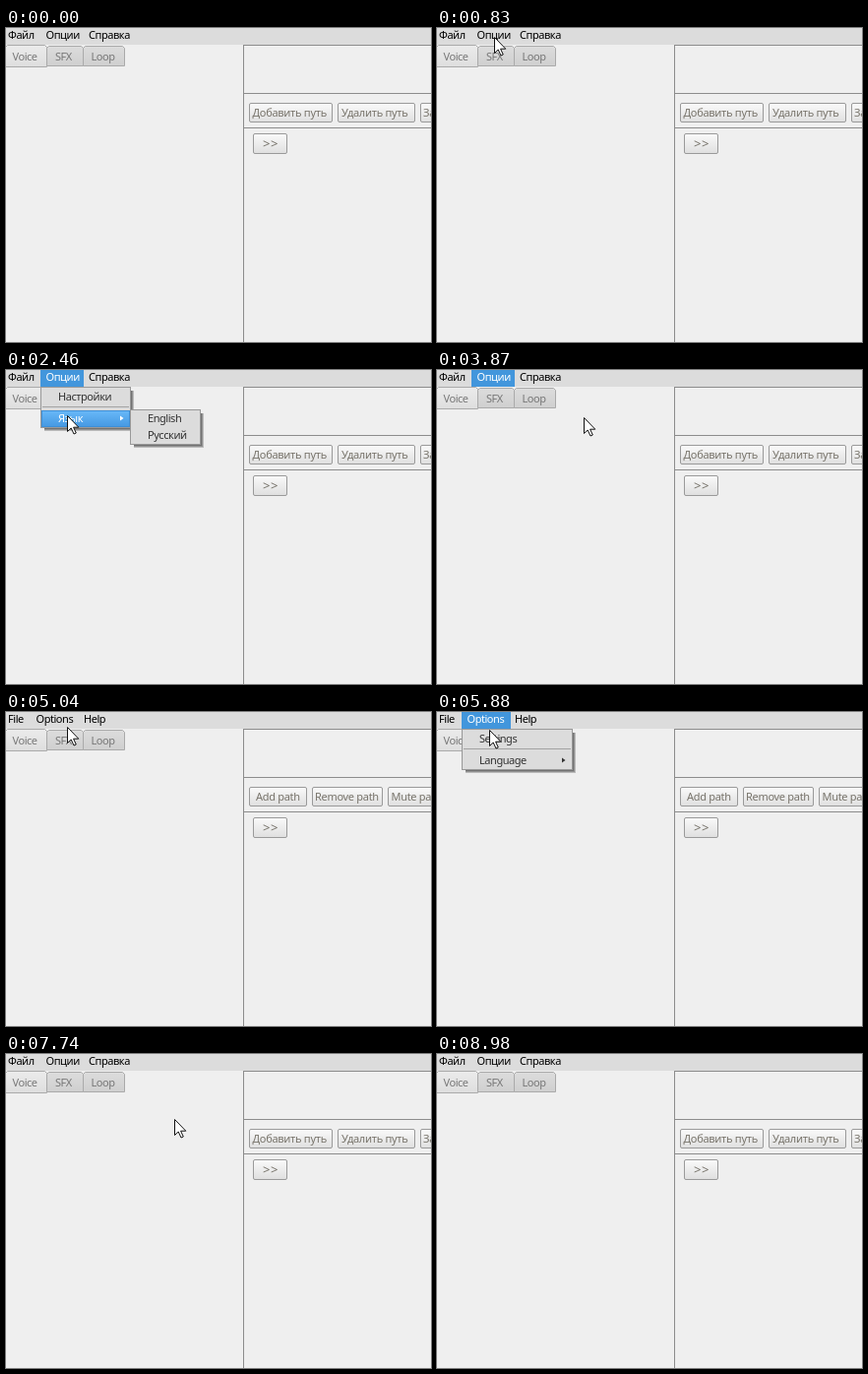
Animation of 432x319 px, one loop 9.36 s. Source, as an HTML page:

```html
<!DOCTYPE html>
<html lang="ru">
<head>
<meta charset="utf-8">
<style>
  html, body { margin: 0; width: 100%; height: 100%; overflow: hidden; background: #efefef; }
  svg { display: block; }
  text { font: 11px "Noto Sans", sans-serif; letter-spacing: -.45px; white-space: pre; }
</style>
</head>
<body>
<svg width="432" height="319" viewBox="0 0 432 319">
  <defs>
    <linearGradient id="btn" x2="0" y2="1"><stop stop-color="#fafafa"/><stop offset="1" stop-color="#dfdfdf"/></linearGradient>
    <linearGradient id="tab" x2="0" y2="1"><stop stop-color="#dcdcdc"/><stop offset="1" stop-color="#cfcfcf"/></linearGradient>
    <linearGradient id="sel" x2="0" y2="1"><stop stop-color="#ebebeb"/><stop offset="1" stop-color="#dedede"/></linearGradient>
    <linearGradient id="hot" x2="0" y2="1"><stop stop-color="#68b8f8"/><stop offset="1" stop-color="#4699e2"/></linearGradient>
  </defs>
  <g id="ui"></g>
  <path id="cursor" d="M.5 .5V16.5L4.2 13L7 19L9.3 18L6.6 12.2H11.8Z" fill="#fff" stroke="#111"/>
</svg>
<script>
const LOOP = 9360;
const ui = document.getElementById('ui'), cursor = document.getElementById('cursor');

const LANG = {
  ru: {
    bar: [[2, 'Файл'], [40.5, 'Опции'], [84, 'Справка']],
    head: [35, 43], popup: [35, 92], items: ['Настройки', 'Язык'],
    buttons: [[247, 84, 250.5, 'Добавить путь'], [337, 78, 341, 'Удалить путь'], [421, 96, 424, 'Заглушить путь']]
  },
  en: {
    bar: [[2, 'File'], [30.5, 'Options'], [79, 'Help']],
    head: [25, 49], popup: [25, 113], items: ['Settings', 'Language'],
    buttons: [[247, 58, 254, 'Add path'], [311, 71, 314, 'Remove path'], [388, 62, 391.5, 'Mute path']]
  }
};

// Pointer moves: first change, last change, steps, end x, end y, easing
const linear = k => k, easeIn = k => k * k, easeOut = k => 1 - (1 - k) ** 2;
const START = [328, 329];
const MOVES = [
  [140, 830, 10, 58, 9, easeOut],
  [2070, 2310, 4, 62, 46, linear],
  [2780, 3090, 5, 149, 48, easeOut],
  [4640, 4810, 3, 78, 24, linear],
  [4960, 5120, 3, 54, 10, linear],
  [5270, 5350, 2, 53, 6, linear],
  [5880, 5880, 1, 53, 18, linear],
  [5960, 6040, 2, 61, 40, linear],
  [6360, 6590, 4, 64, 46, linear],
  [6820, 7050, 4, 172, 53, linear],
  [7120, 7200, 2, 172, 71, linear],
  [7430, 7510, 2, 171, 66, linear],
  [8670, 8980, 5, 448, 441, easeIn]
];

function pointer(t) {
  let [x, y] = START;
  for (const [from, to, n, ex, ey, ease] of MOVES) {
    if (t < from) break;
    const gap = n > 1 ? (to - from) / (n - 1) : 1;
    const k = ease(Math.min(n, Math.floor((t - from) / gap + .001) + 1) / n);
    x += (ex - x) * k;
    y += (ey - y) * k;
  }
  return [Math.round(x), Math.round(y)];
}

const rect = (x, y, w, h, fill, more = '') =>
  `<rect x="${x}" y="${y}" width="${w}" height="${h}" fill="${fill}" ${more}/>`;
const box = (x, y, w, h, fill, stroke, r = 0) =>
  rect(x + .5, y + .5, w - 1, h - 1, fill, `stroke="${stroke}" rx="${r}"`);
const label = (x, y, s, fill, style = '') =>
  `<text x="${x}" y="${y}" fill="${fill}" style="${style}">${s}</text>`;

function tab(x, y, w, h, fill, s, tx) {
  const r = x + w - .5;
  return `<path d="M${x + .5} ${y + h - .5}V${y + 2.5}l2 -2H${r - 2}l2 2V${y + h - .5}Z" fill="${fill}" stroke="#aaa"/>`
    + label(tx, 33, s, '#777');
}

const button = ([x, w, tx, s]) =>
  box(x, 76, w + 1, 20, 'url(#btn)', '#9a9a9a', 1.5) + label(tx, 90, s, '#77736a', 'letter-spacing:-.3px');

function panel(x, y, w, h) {
  let s = '';
  for (let i = 3; i > 0; i--) s += rect(x + 4, y + 4, w - 4 + i, h - 4 + i, '#000', 'opacity=".22"');
  return s + box(x, y, w, h, '#dcdcdc', '#999');
}

const row = (x, y, w, s, hot) =>
  (hot ? box(x + 1, y, w - 2, 17, 'url(#hot)', '#3f8fd6') : '') + label(x + 18, y + 12, s, hot ? '#fff' : '#333');

function scene(lang, open, popup, hotLang, sub, choice) {
  const L = LANG[lang], [hx, hw] = L.head, [px, pw] = L.popup;
  let s = rect(0, 0, 432, 319, '#efefef')
    + tab(-1, 17, 43, 23, 'url(#sel)', 'Voice', 6.5)
    + tab(41, 18, 38, 21, 'url(#tab)', 'SFX', 50)
    + tab(78, 18, 43, 21, 'url(#tab)', 'Loop', 86.5)
    + rect(241, 17, 1, 302, '#8c8c8c')
    + [17, 66, 101].map(y => rect(241, y, 191, 1, '#8c8c8c')).join('')
    + L.buttons.map(button).join('')
    + box(251, 107, 35, 21, 'url(#btn)', '#9a9a9a', 1.5)
    + label(261, 122, '&gt;&gt;', '#77736a', 'font-size:13px;letter-spacing:.6px')
    + rect(0, 0, 432, 17, '#dcdcdc');
  if (open) s += rect(hx, 0, hw + 1, 17, '#4296dc');
  s += L.bar.map(([x, w], i) => label(x, 11, w, open && i == 1 ? '#fff' : '#000')).join('');
  if (popup) {
    const ax = px + pw - 11;
    s += panel(px, 17, pw, 42)
      + row(px, 19, pw, L.items[0], false)
      + rect(px + 2, 37, pw - 4, 1, '#a2a2a2')
      + row(px, 41, pw, L.items[1], hotLang)
      + `<path d="M${ax} 46.5v5l3.5 -2.5Z" fill="${hotLang ? '#fff' : '#333'}"/>`;
  }
  if (sub) {
    const x = px + pw - 1;
    s += panel(x, 40, 72, 36)
      + row(x, 41, 72, 'English', choice == 1)
      + row(x, 58, 72, 'Русский', choice == 2);
  }
  return s;
}

let last = '';
function draw(now) {
  const t = now % LOOP, within = (a, b) => t >= a && t < b;
  const [x, y] = pointer(t);
  const lang = within(3940, 7740) ? 'en' : 'ru';
  const [px, pw] = LANG[lang].popup;
  const sub = within(2460, 3870) || within(6590, 7740);
  const choice = sub && x > px + pw ? (y < 58 ? 1 : 2) : 0;
  const state = [
    lang,
    within(1370, 3940) || within(5500, 7740),
    within(1440, 3870) || within(5580, 7740),
    within(2230, 3870) || within(6360, 7740),
    sub, choice
  ];
  if (state.join() != last) {
    last = state.join();
    ui.innerHTML = scene(...state);
  }
  cursor.setAttribute('transform', `translate(${x} ${y})`);
  cursor.style.display = within(140, 8980) ? '' : 'none';
  requestAnimationFrame(() => draw(performance.now() - begin));
}
const begin = performance.now();
draw(0);
</script>
</body>
</html>
```
